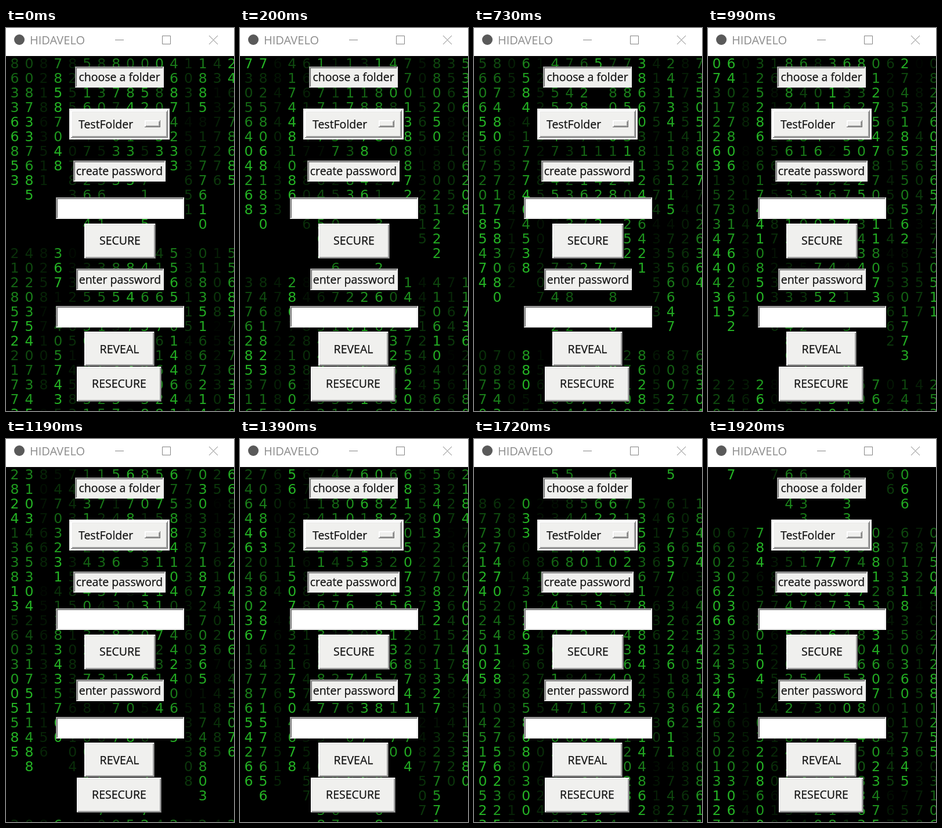
Animation, 393 px wide and 656 px high, one loop 2.05 s. Source, as an HTML page with a canvas:

```html
<!DOCTYPE html>
<html lang="en">
<head>
<meta charset="utf-8">
<title>HIDAVELO</title>
<style>
  html, body { margin: 0; width: 100%; height: 100%; overflow: hidden; background: #000; }
  #stage { position: absolute; left: 0; top: 0; width: 393px; height: 656px; overflow: hidden;
    font: 19.5px "Open Sans", "Noto Sans", sans-serif; color: #111; }
  #stage > * { position: absolute; box-sizing: border-box; }
  .bar { left: 0; top: 0; width: 393px; height: 48px; background: #fff; }
  .bar * { position: absolute; }
  .mark { left: 14px; top: 11px; width: 18px; height: 18px; border-radius: 50%; background: #5a5a5a; }
  .title { left: 41px; top: 0; line-height: 42px; font-size: 20px; color: #8c8c8c; white-space: pre; }
  .bar svg { left: 0; top: 0; }
  .box { background: #f0f0ee; text-align: center; white-space: pre; -webkit-text-stroke: .25px #111; }
  .sunk { box-shadow: inset -1px -1px #fff, inset 2px 2px #a0a0a0,
    inset -2px -2px #e3e3e3, inset 3px 3px #696969; }
  .entry { background: #fff; }
  .raised { box-shadow: inset -1px -1px #696969, inset 2px 2px #fff,
    inset -3px -3px #a0a0a0, inset 3px 3px #e8e8e8; }
  .rim { background: #f4f4f4; }
</style>
</head>
<body>
<div id="stage">
  <canvas id="rain" width="393" height="656" style="left:0;top:0"></canvas>
  <div class="bar">
    <i class="mark"></i>
    <span class="title">HIDAVELO</span>
    <svg width="393" height="48" fill="none" stroke="#858585">
      <path d="M188 20.5H203M269.5 13.5H283.5V27.5H269.5ZM350 13L365 28M365 13L350 28"/>
    </svg>
  </div>
</div>
<script>
const stage = document.getElementById("stage");
const ctx = document.getElementById("rain").getContext("2d");

function box(kind, x, y, right, bottom, text = "", lift = 0) {
  const el = document.createElement("div");
  el.className = "box " + kind;
  el.textContent = text;
  const h = bottom - y;
  el.style.cssText = `left:${x}px;top:${y}px;width:${right - x}px;height:${h}px;` +
    `line-height:${h - lift * 2}px`;
  stage.append(el);
  return el;
}

box("sunk", 119, 66, 272, 102, "choose a folder");
box("rim", 109, 138, 282, 191);
const menu = box("raised", 112, 141, 279, 188, "TestFolder");
menu.style.textAlign = "left";
menu.style.paddingLeft = "13px";
box("raised", 239, 158, 266, 170);
box("sunk", 116, 227, 275, 263, "create password");
box("sunk entry", 86, 290, 307, 327);
box("raised", 135, 335, 258, 395, "SECURE", 1);
box("sunk", 121, 412, 272, 449, "enter password");
box("sunk entry", 86, 476, 307, 513);
box("raised", 135, 520, 256, 579, "REVEAL");
box("raised", 122, 580, 268, 640, "RESECURE", 1);

// Each column: strength, then the stream heads in a cycle of 27 rows.
// The first head ends the cycle's main block; it is dark from there to GAP_END.
const CYCLE = 27, GAP_END = 13, PITCH = 25, ROWS = 25;
const columns = [
  [1, 8, 5, 19, 25], [1, 9, 5, 19, 25], [.2, 8, 3, 16, 22], [1, 7, 3, 15, 23],
  [.25, 9, 3, 19, 25], [.75, 11, 3, 20, 25], [.65, 12, 4, 18, 24], [.8, 8, 2, 17, 24],
  [.95, 8, 4, 16, 21], [.85, 12, 3, 14, 18, 25], [.85, 6, 0, 18, 24],
  [.95, 7, 3, 16, 21, 24], [.3, 10, 3, 18, 24], [.95, 11, 3, 18, 24],
  [.3, 8, 1, 17, 25], [.95, 8, 1, 17, 24]
];

const steps = "1010110110101101011".split("").map(s => s === "1" ? 130 : 70);
const LOOP = steps.reduce((a, b) => a + b);

const mod = (a, n) => ((a % n) + n) % n;

function rand(a, b, c) {
  let h = Math.imul(a + 11, 374761393) ^ Math.imul(b + 7, 668265263) ^ Math.imul(c + 3, 1274126177);
  h = Math.imul(h ^ (h >>> 13), 1103515245);
  return ((h ^ (h >>> 16)) >>> 0) / 4294967296;
}

function glow([strength, ...heads], pos) {
  const p = mod(pos, CYCLE);
  if (p > heads[0] && p < GAP_END) return 0;
  const d = Math.min(...heads.map(h => mod(h - p, CYCLE)));
  return strength * Math.max(0, Math.min(1, 1.18 - d / 6.5));
}

function drawRain(step) {
  ctx.globalAlpha = 1;
  ctx.fillStyle = "#000";
  ctx.fillRect(0, 48, 393, 608);
  ctx.fillStyle = "#24b424";
  ctx.font = '23.5px "DejaVu Sans", Verdana, sans-serif';
  ctx.textAlign = "center";
  columns.forEach((col, c) => {
    for (let r = 0; r < ROWS; r++) {
      const level = glow(col, r - step);
      if (level < .03) continue;
      ctx.globalAlpha = level;
      ctx.fillText(Math.floor(rand(c, r, step) * 9), 15 + c * 24.95, 68.5 + r * PITCH);
    }
  });
}

let shown = -1;
const start = performance.now();
function tick() {
  let t = (performance.now() - start) % LOOP, step = 0;
  while (t >= steps[step]) t -= steps[step++];
  if (step !== shown) drawRain(shown = step);
  requestAnimationFrame(tick);
}
tick();
</script>
</body>
</html>
```
